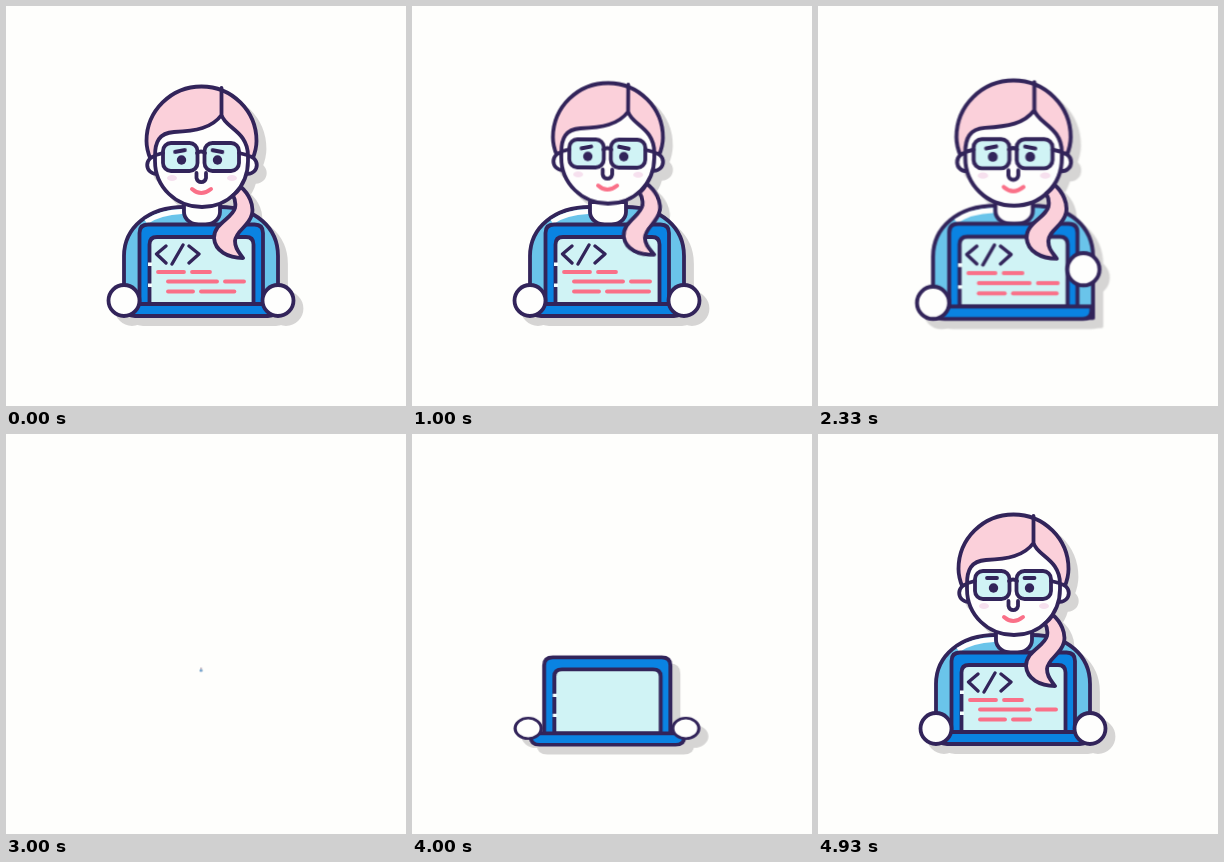
An HTML page for the animation above (4990 ms loop, 400 px wide and 400 px high).

```html
<!DOCTYPE html>
<html lang="en">
<head>
<meta charset="utf-8">
<title>Coder with laptop</title>
<style>
  html, body { margin: 0; width: 100%; height: 100%; overflow: hidden; background: #fefefc; }
  svg { display: block; width: 100vw; height: 100vh; }

  .line { fill: none; }
  .ink { stroke: #32245a; stroke-width: 3.8; stroke-linecap: round; stroke-linejoin: round; }
  .thin { stroke-width: 3.3; }
  .skin { fill: #fefefd; }
  .hair { fill: #fbd0da; }
  .shirt { fill: #6ac4ea; }
  .case { fill: #0a83e2; }
  .glass { fill: #d0f3f5; }
  .cheek { fill: #f6e0ee; }

  .all, .all g, .seg, .slash, .left, .right, .brow { animation: 4.99s ease-in-out infinite; }
  .all { transform-origin: 195px 236px; animation-name: vanish; filter: drop-shadow(8px 8px 0 #d6d5d4); }
  .all .body { transform-origin: 195px 311px; animation-name: body; }
  .all .rise { transform-origin: 195px 201px; animation-name: rise; }
  .all .nod { transform-origin: 196px 205px; animation-name: nod; }
  .all .tail { transform-origin: 234px 184px; animation-name: tail; }
  .all .laptop { transform-origin: 195px 264px; animation-name: laptop; }
  .all .code { animation-name: code; }
  .all .hand-l { --in: 34px; transform-origin: 118px 294px; animation-name: hand; }
  .all .hand-r { --in: -34px; transform-origin: 272px 294px; animation-name: hand; }
  .all .wave { animation-name: wave; }
  .left { --dx: 4.5px; animation-name: spread; }
  .right { --dx: -4.5px; animation-name: spread; }
  .slash { transform-origin: 171.5px 248px; animation-name: slash; }
  .brow { animation-name: brow; }
  .brow.l { --tilt: -11deg; transform-origin: 174px 145px; }
  .brow.r { --tilt: 11deg; transform-origin: 211px 145px; }
  .seg {
    fill: none; stroke: #fa7088; stroke-width: 3.8; stroke-linecap: round;
    stroke-dasharray: 1 3;
    animation-name: type; animation-delay: calc(var(--d) - 4.99s);
  }

  @keyframes vanish {
    0%, 44.1% { transform: scale(1); }
    47.1% { transform: scale(1.04); animation-timing-function: ease-in; }
    53.5% { transform: scale(.75); animation-timing-function: linear; }
    60.1% { transform: scale(.015); }
    61.1% { transform: scale(0); }
    61.11%, 100% { transform: scale(1); }
  }
  @keyframes laptop {
    0%, 61.1% { transform: none; }
    61.11%, 61.6% { transform: translateY(-28px) scale(0); animation-timing-function: linear; }
    64.1% { transform: translateY(-24px) scale(.6); animation-timing-function: ease-out; }
    68.1% { transform: translateY(-118px) scale(1.04); }
    70.5% { transform: translateY(-130px); animation-timing-function: cubic-bezier(.4, 0, 1, 1); }
    74.75% { transform: translateY(-66px); animation-timing-function: linear; }
    77% { transform: none; }
    78.6% { transform: translateY(5px) scale(1.04, .92); }
    82%, 100% { transform: none; }
  }
  @keyframes body {
    0%, 61.1% { transform: none; }
    61.11%, 83.5% { transform: scale(0); }
    83.6% { transform: scale(.8, .7); }
    86.8% { transform: scale(.88, .9); animation-timing-function: ease-out; }
    91.5% { transform: scale(1.02, 1.02); }
    95.5%, 100% { transform: none; }
  }
  @keyframes rise {
    0%, 61.1% { transform: none; }
    61.11%, 83.5% { transform: translateY(85px) scale(0); }
    83.6% { transform: translateY(88px) scale(.6); animation-timing-function: linear; }
    85.6% { transform: translateY(50px) scale(.75); animation-timing-function: linear; }
    86.8% { transform: translateY(14px) scale(.87); animation-timing-function: ease-out; }
    91% { transform: translateY(-3px) scale(1.01); }
    96.2%, 100% { transform: none; }
  }
  @keyframes nod {
    0% { transform: none; }
    12% { transform: rotate(6deg); }
    17.5% { transform: translateY(-3px) rotate(3deg); }
    23% { transform: translateY(-4px) rotate(-3deg); }
    32.1% { transform: rotate(-1.3deg); }
    38% { transform: rotate(1.5deg); }
    44.1%, 100% { transform: none; }
  }
  @keyframes tail {
    0% { transform: none; }
    12% { transform: translateY(2px); }
    22% { transform: rotate(-5deg); }
    32.1% { transform: translateY(1px); }
    38% { transform: rotate(3deg); }
    44.1%, 61.1% { transform: none; }
    61.11%, 89% { transform: scale(0); }
    94% { transform: scale(1.06) rotate(-5deg); }
    97.5%, 100% { transform: none; }
  }
  @keyframes hand {
    0%, 61.1% { transform: none; }
    61.11%, 78% { transform: translateX(var(--in)) scale(0); animation-timing-function: ease-out; }
    82% { transform: translateX(calc(var(--in) * -.44)) scale(1.15, .9); }
    85.6%, 86.8% { transform: scale(1.2, .9); }
    91% { transform: scale(.95, 1.04); }
    95%, 100% { transform: none; }
  }
  @keyframes wave {
    0%, 23% { transform: none; }
    30%, 34% { transform: translate(-20px, -70px); }
    38% { transform: translate(-18px, -66px); }
    42%, 44.1% { transform: translate(-20px, -70px); }
    49.1%, 100% { transform: none; }
  }
  @keyframes code {
    0%, 61.1% { opacity: 1; }
    61.11%, 83.6% { opacity: 0; }
    83.61%, 100% { opacity: 1; }
  }
  @keyframes spread {
    0%, 61.1% { transform: none; }
    61.11%, 83.6% { transform: translateX(calc(var(--dx) * 2)); }
    86.8% { transform: translateX(var(--dx)); }
    92%, 100% { transform: none; }
  }
  @keyframes slash {
    0%, 61.1% { transform: none; }
    61.11%, 86% { transform: scale(.01); }
    86.8% { transform: scale(.9, .05); }
    93%, 100% { transform: none; }
  }
  @keyframes type {
    0%, 60% { stroke-dashoffset: 0; }
    60.01%, 84.4% { stroke-dashoffset: 1.2; animation-timing-function: ease-out; }
    88.4%, 100% { stroke-dashoffset: 0; }
  }
  @keyframes brow {
    0%, 60% { transform: rotate(var(--tilt)); }
    61%, 98.8% { transform: translateY(-1px); }
    100% { transform: rotate(var(--tilt)); }
  }
</style>
</head>
<body>
<svg viewBox="0 0 400 400">
  <g class="all">
    <g class="body">
      <path class="ink shirt" d="M118 309V250C118 222 142 201 178 201H214C250 201 272 222 272 250V309Z"/>
      <path class="line" stroke="#fefefd" stroke-width="5" d="M140 216C150 209 162 206 176 205.500"/>
      <path class="ink skin" d="M178 196V206C178 214 186 219 196 219S214 214 214 206V196Z"/>
    </g>

    <g class="rise">
      <g class="nod">
        <path class="ink hair" d="M144.500 153C142 147 140.500 141 140.500 135A55 54.500 0 0 1 250.500 135C250.500 141 249 147 246.500 153Z"/>
        <circle class="ink skin" cx="150" cy="159" r="8.800"/>
        <circle class="ink skin" cx="242" cy="159" r="8.800"/>
        <path class="skin" d="M149 150C149 136 153 127 168 126C190 125 206 122 215.500 109C219 122 242 125 242 150V155C242 181 222 201 196 201S149 181 149 155Z"/>
        <path class="ink line" d="M215.500 82V109C206 122 190 125 168 126C153 127 149 136 149 150V155C149 181 170 201 196 201S242 181 242 155V150C242 125 219 122 215.500 109"/>
        <ellipse class="cheek" cx="166" cy="172" rx="5" ry="3"/>
        <ellipse class="cheek" cx="226" cy="172" rx="5" ry="3"/>
        <g class="ink">
          <rect class="glass" x="157" y="137" width="34.500" height="28" rx="8"/>
          <rect class="glass" x="198.500" y="137" width="34.500" height="28" rx="8"/>
          <path class="line" d="M191 147Q195 144 199 147M157 147L150 149M233 147L241 149"/>
        </g>
        <g fill="#32245a">
          <circle cx="175.500" cy="154" r="4.700"/>
          <circle cx="211.500" cy="154" r="4.700"/>
        </g>
        <path class="ink line brow l" d="M169 145H179"/>
        <path class="ink line brow r" d="M206.500 145H216.500"/>
        <path class="ink line" d="M190.500 167V172A4.800 4.800 0 0 0 200 172V167"/>
        <path class="line" stroke="#fa7088" stroke-width="4" stroke-linecap="round" d="M186 183Q195 191 205 183"/>
      </g>
    </g>

    <g class="laptop">
      <path class="ink case" d="M133.500 300V227Q133.500 218.500 142 218.500H248.500Q257 218.500 257 227V300Z"/>
      <path class="ink glass" d="M143.500 298V238.500Q143.500 231 151 231H240Q247.500 231 247.500 238.500V298Z"/>
      <path class="line" stroke="#f4fdfd" stroke-width="4" d="M144 256.500V260M144 277.500V281"/>
      <path class="ink case" d="M120.500 298H270.500V302Q270.500 310 262 310H129Q120.500 310 120.500 302Z"/>
      <g class="code">
        <g class="ink thin line">
          <path class="left" d="M160 240L150.500 248L160 257"/>
          <path class="slash" d="M177 239L166 258"/>
          <path class="right" d="M183 240L193 248L183 257"/>
        </g>
        <path class="seg" pathLength="1" style="--d:0s" d="M152 266H178"/>
        <path class="seg" pathLength="1" style="--d:.1s" d="M186 266H204"/>
        <path class="seg" pathLength="1" style="--d:.2s" d="M162 275.500H211"/>
        <path class="seg" pathLength="1" style="--d:.3s" d="M219 275.500H238"/>
        <path class="seg" pathLength="1" style="--d:.4s" d="M162 285.500H187"/>
        <path class="seg" pathLength="1" style="--d:.65s" d="M195 285.500H237"/>
      </g>
    </g>

    <g class="nod">
      <g class="tail">
        <path class="ink hair" d="M235 181C243 188 248 199 246 208C243 221 230 224 229 235C229 243 233 246 237 252C222 252 209 245 208 232C208 217 226 213 229 202C230 197 229 193 227 189.500Q231.500 186 235 181Z"/>
      </g>
    </g>

    <g class="hand-l"><circle class="ink skin" cx="118" cy="294.500" r="15.500"/></g>
    <g class="wave">
      <g class="hand-r"><circle class="ink skin" cx="272" cy="294.500" r="15.500"/></g>
    </g>
  </g>
</svg>
</body>
</html>
```
